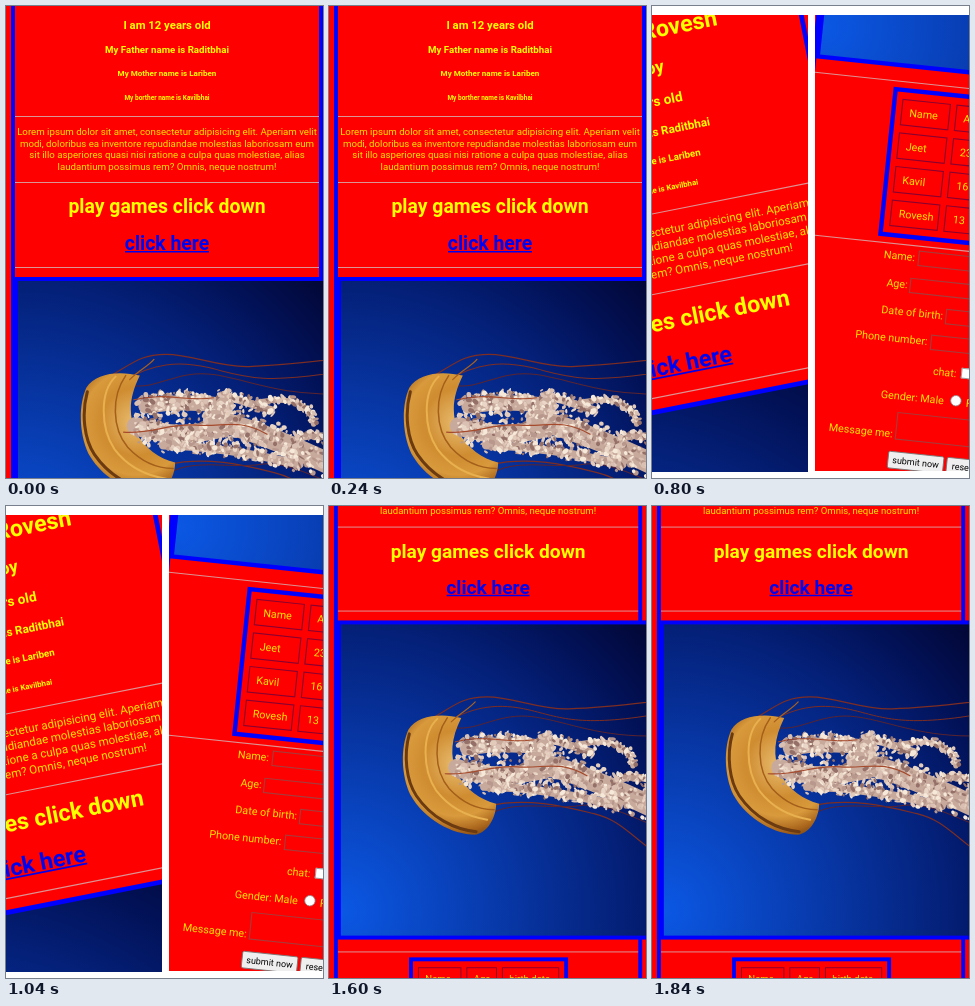
Recreate the animation shown at these times as an HTML page with a canvas. Size 317x472 px, loop 2000 ms.

```html
<!DOCTYPE html>
<html lang="en">
<head>
<meta charset="utf-8">
<title>Web page views</title>
<style>
  html, body { margin: 0; width: 100%; height: 100%; overflow: hidden; background: #fff; }
  canvas { display: block; width: 317px; height: 472px; }
</style>
</head>
<body>
<canvas id="stage"></canvas>
<script>
const W = 317, H = 472, HOLD = 400;
const RED = '#f00', BLUE = '#00f', YELLOW = '#ff0', SOFT_YELLOW = '#ffe400';
const canvas = document.getElementById('stage');
const ctx = canvas.getContext('2d');
const dpr = window.devicePixelRatio || 1;
canvas.width = W * dpr;
canvas.height = H * dpr;

// Each scene is a list of panels: clip box, then scale, degrees and offset of the page.
const scenes = [
  [{ clip: [0, 0, W, H], scale: 1, turn: 0, at: [0, 0] }],
  [{ clip: [0, 0, W, H], scale: 1, turn: 0, at: [0.5, -422] }],
  [{ clip: [0, 9, 156, 457], scale: 1.2, turn: -11.2, at: [-215, 115.4] },
   { clip: [163, 9, 154, 456], scale: 1.11, turn: 6, at: [223.3, -604.3] }],
  [{ clip: [0, 12, 233, 460], scale: 0.962, turn: 0, at: [-69.5, -323] },
   { clip: [241, 12, 76, 460], scale: 0.962, turn: 0, at: [236, 82.7] }],
  [{ clip: [0, 0, W, H], scale: 0.988, turn: 0, at: [0, -153.3] }]
];

function box(color, x, y, w, h) {
  ctx.fillStyle = color;
  ctx.fillRect(x, y, w, h);
}

function outline(color, x, y, w, h, width = 1) {
  ctx.strokeStyle = color;
  ctx.lineWidth = width;
  ctx.strokeRect(x + width / 2, y + width / 2, w - width, h - width);
}

// y is the middle of the letters
function text(str, x, y, { size = 9.7, bold = false, align = 'left', color = SOFT_YELLOW } = {}) {
  ctx.font = `${bold ? 700 : 400} ${size}px Roboto, sans-serif`;
  ctx.textAlign = align;
  ctx.fillStyle = color;
  ctx.fillText(str, x, y + size * 0.35);
}

const heading = (str, y, size, color = YELLOW) => text(str, 161, y, { size, bold: true, align: 'center', color });
const rule = y => box('#dc9494', 9, y, 304, 1);

function stroke(path, color, width) {
  ctx.strokeStyle = color;
  ctx.lineWidth = width;
  ctx.stroke(new Path2D(path));
}

function shade(gradient, ...stops) {
  stops.forEach(([at, color]) => gradient.addColorStop(at, color));
  return gradient;
}

function seeded(seed) {
  return () => (seed = (seed * 16807) % 2147483647) / 2147483647;
}

// A ruffled ribbon of small blobs along a quadratic curve
function frill(rand, [x0, y0, x1, y1, x2, y2], count, spread) {
  const tones = ['#ead6c6', '#d9c0b2', '#f6e9d9', '#b8988c', '#e3cbbb', '#947068'];
  stroke(`M${x0} ${y0}Q${x1} ${y1} ${x2} ${y2}`, '#c8aa9c', spread * 0.75);
  for (let i = 0; i < count; i++) {
    const t = i / count, u = 1 - t;
    const x = u * u * x0 + 2 * u * t * x1 + t * t * x2 + (rand() - 0.5) * spread;
    const y = u * u * y0 + 2 * u * t * y1 + t * t * y2 + (rand() - 0.5) * spread * 1.2;
    ctx.fillStyle = tones[Math.floor(rand() * tones.length)];
    ctx.beginPath();
    ctx.ellipse(x, y, 1 + rand() * 2.6, 0.8 + rand() * 1.8, rand() * 3, 0, 7);
    ctx.fill();
  }
}

function bell() {
  const dome = new Path2D('M132 212C112 207 88 209 79 224C71 242 72 270 81 289C95 314 123 329 146 329C159 327 167 311 167 298C151 294 137 284 128 268C120 250 122 232 132 212Z');
  ctx.fillStyle = shade(ctx.createRadialGradient(128, 258, 8, 128, 258, 82),
    [0, '#e3b262'], [0.35, '#cf8c30'], [0.6, '#d89a3c'], [0.8, '#a9651c'], [1, '#5c330f']);
  ctx.fill(dome);
  stroke('M80 228C74 250 77 275 87 290C102 312 125 324 147 326', '#6b3a10', 3);
  stroke('M108 213C92 228 93 264 107 285C120 302 138 311 158 314', '#e8b04e', 2);
  stroke('M118 212C104 232 104 264 120 283C134 298 150 304 165 304', '#a45f1a', 1.5);
}

function jellyfish() {
  const rand = seeded(77);
  const rust = '#7d2d22', dark = '#5a2430';
  ctx.save();
  ctx.translate(0.5, 155.5);
  ctx.scale(1.01, 1.01);
  ctx.lineCap = 'round';

  stroke('M100 214C125 200 132 191 158 191S210 204 240 203S290 200 330 195', rust, 1.2);
  stroke('M118 216C145 200 170 197 200 204S250 222 330 208', rust, 1);
  stroke('M126 222C150 225 170 206 205 211S270 232 330 230', dark, 1);
  stroke('M160 300C200 291 240 302 265 308S300 328 330 350', rust, 1.2);
  stroke('M162 308C185 294 225 304 250 300S300 310 330 322', dark, 1);
  bell();

  frill(rand, [215, 231, 235, 238, 262, 246], 70, 10);
  frill(rand, [250, 238, 300, 230, 304, 260], 60, 7);
  frill(rand, [285, 277, 305, 266, 325, 276], 45, 9);
  frill(rand, [128, 262, 165, 276, 215, 264], 190, 24);
  frill(rand, [138, 242, 175, 236, 218, 242], 150, 20);
  frill(rand, [205, 256, 250, 266, 325, 302], 260, 28);
  frill(rand, [155, 281, 215, 282, 290, 300], 130, 11);

  stroke('M116 268C145 270 160 259 188 261S230 254 258 270', '#a54a2c', 1.2);
  stroke('M126 236C155 228 178 238 205 234', '#a54a2c', 1);
  stroke('M122 216C132 206 140 203 146 196', '#a8601e', 1.2);
  ctx.restore();
}

function picture() {
  box(BLUE, 5, 271, 325, 323);
  const sea = shade(ctx.createRadialGradient(12, 565, 0, 12, 565, 420),
    [0, '#0b58e4'], [0.35, '#083bae'], [0.68, '#042078'], [0.85, '#021156'], [1, '#020736']);
  box(sea, 12, 275, 318, 315);
  ctx.save();
  ctx.beginPath();
  ctx.rect(12, 275, 318, 315);
  ctx.clip();
  jellyfish();
  ctx.restore();
}

function intro() {
  heading('My name is Rovesh', -40, 19.4);
  heading('I am a boy', -9, 14.5);
  heading('I am 12 years old', 19, 11.35);
  heading('My Father name is Raditbhai', 44, 9.7);
  heading('My Mother name is Lariben', 67.5, 8.05);
  heading('My borther name is Kavilbhai', 91.5, 6.5);
  rule(110);
  [
    'Lorem ipsum dolor sit amet, consectetur adipisicing elit. Aperiam velit',
    'modi, doloribus ea inventore repudiandae molestias laboriosam eum',
    'sit illo asperiores quasi nisi ratione a culpa quas molestiae, alias',
    'laudantium possimus rem? Omnis, neque nostrum!'
  ].forEach((line, i) => text(line, 161, 126 + i * 11.4, { align: 'center' }));
  rule(176);
  heading('play games click down', 200.5, 19.4);
  heading('click here', 237, 19.4, '#00e');
  box('#00e', 119, 245, 84, 1.5);
  rule(261);
}

function table() {
  rule(606);
  outline(BLUE, 81, 612, 161, 135, 4);
  const columns = [[90, 44], [139, 31], [175, 58]];
  [
    ['Name', 'Age', 'birth date'],
    ['Jeet', '23', '22-3-1997'],
    ['Kavil', '16', '6-6-2003'],
    ['Rovesh', '13', '5-9-2008']
  ].forEach((row, r) => row.forEach((value, c) => {
    const [x, w] = columns[c], y = 622 + r * 30.4;
    outline('#8a0030', x, y, w, 24);
    text(value, x + 7.5, y + 12);
  }));
  rule(752);
}

function radio(x, y) {
  ctx.beginPath();
  ctx.arc(x, y, 4.7, 0, 7);
  ctx.fillStyle = '#fff';
  ctx.fill();
  ctx.strokeStyle = '#888';
  ctx.lineWidth = 0.7;
  ctx.stroke();
}

function button(label, x, w) {
  ctx.beginPath();
  ctx.roundRect(x, 939, w, 15, 1.5);
  ctx.fillStyle = '#efefef';
  ctx.fill();
  ctx.strokeStyle = '#777';
  ctx.lineWidth = 0.8;
  ctx.stroke();
  text(label, x + w / 2, 946.5, { size: 8.1, align: 'center', color: '#000' });
}

function form() {
  [
    ['Name:', 88, 763, 119, 117],
    ['Age:', 93, 788, 114, 117],
    ['Date of birth:', 91, 812.5, 149, 84],
    ['Phone number:', 70, 837, 138, 116]
  ].forEach(([label, x, y, left, width]) => {
    text(label, x, y);
    outline('#a63c3c', left, y - 6.5, width, 14);
  });
  stroke('M225.5 812l2.5 2.5 2.5-2.5', '#400', 1);

  text('chat:', 143, 863);
  box('#fff', 168.5, 857.5, 9.5, 9.5);
  outline('#888', 168.5, 857.5, 9.5, 9.5, 0.7);

  text('Gender: Male', 98.5, 888.5);
  radio(166.3, 887.5);
  text('Female', 175.5, 888.5);
  radio(217, 887.5);

  text('Message me:', 55, 923);
  outline('#a63c3c', 115, 903, 110, 25);
  button('submit now', 111, 50);
  button('reset now', 164, 45);
}

function page() {
  box(RED, -200, -300, 900, 1500);
  outline(BLUE, 5, -69, 312, 1060, 4);
  intro();
  picture();
  table();
  form();
}

function drawScene(panels) {
  ctx.setTransform(dpr, 0, 0, dpr, 0, 0);
  box('#fff', 0, 0, W, H);
  for (const { clip, scale, turn, at } of panels) {
    ctx.save();
    ctx.beginPath();
    ctx.rect(...clip);
    ctx.clip();
    ctx.translate(...at);
    ctx.rotate(turn * Math.PI / 180);
    ctx.scale(scale, scale);
    page();
    ctx.restore();
  }
}

const start = performance.now();
let shown = -1;

function tick() {
  const elapsed = Math.max(0, performance.now() - start);
  const index = Math.floor(elapsed / HOLD) % scenes.length;
  if (index !== shown) {
    shown = index;
    drawScene(scenes[index]);
  }
  requestAnimationFrame(tick);
}
tick();
</script>
</body>
</html>
```
